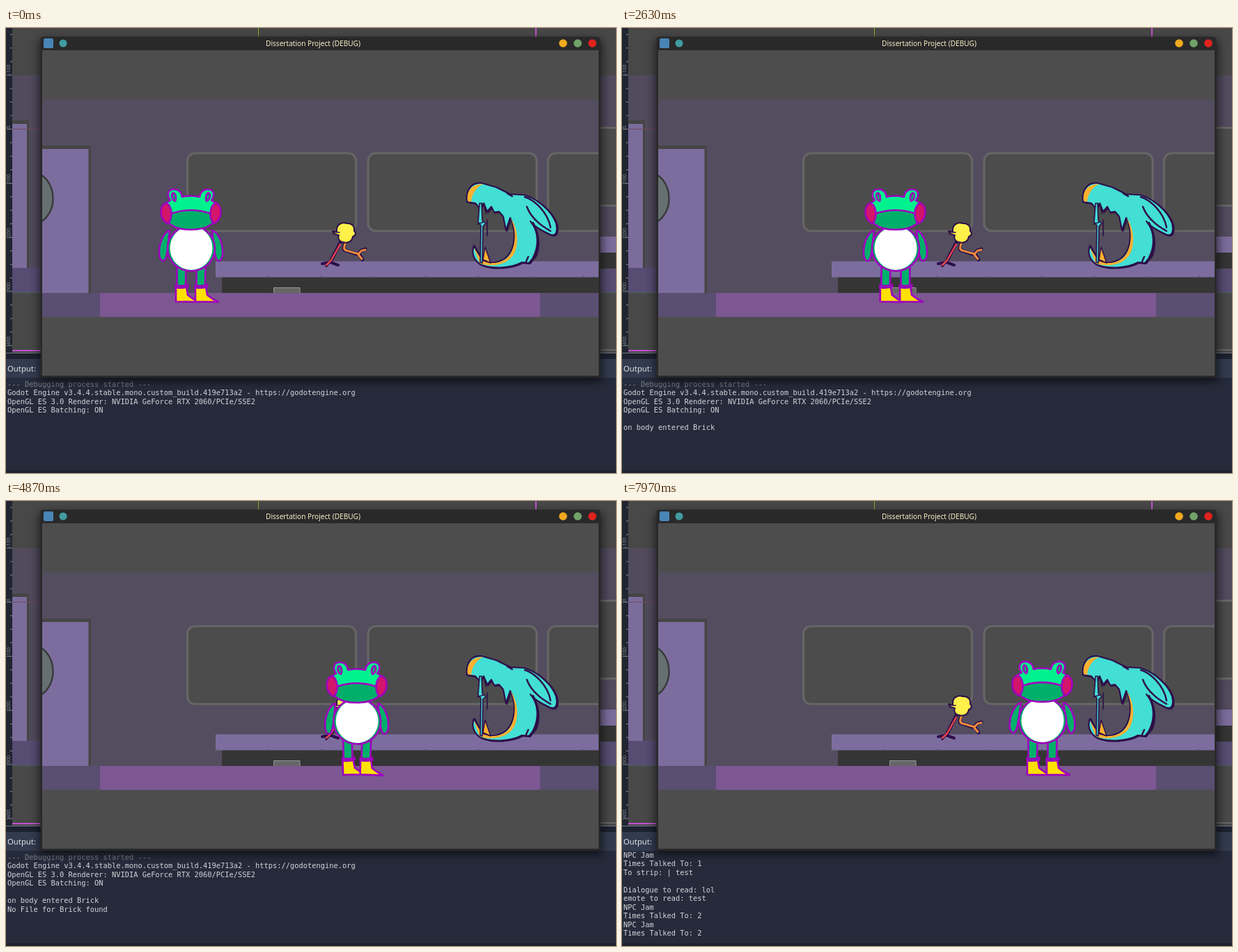
An HTML page that plays this animation: 876x640 px, repeating every 8000 ms.

```html
<!DOCTYPE html>
<html lang="en">
<head>
<meta charset="utf-8">
<title>Frog walk</title>
<style>
html, body { margin: 0; width: 100%; height: 100%; overflow: hidden; background: #262b3b; }
svg { display: block; width: 876px; height: 640px; }
.ui { font-family: "Noto Sans", sans-serif; }
#log { font: 10.38px "DejaVu Sans Mono", monospace; fill: #d3d5d9; white-space: pre; }
.ol { stroke: #a000be; stroke-width: 2.6; stroke-linejoin: round; stroke-linecap: round; }
.ink { stroke: #2d0f4a; stroke-linejoin: round; stroke-linecap: round; }
</style>
</head>
<body>
<svg viewBox="0 0 876 640" xmlns="http://www.w3.org/2000/svg">
<defs>
  <clipPath id="view"><rect x="52" y="32" width="799" height="468"/></clipPath>
  <clipPath id="pane"><rect y="503" width="876" height="133"/></clipPath>
  <filter id="soft" x="-10%" y="-10%" width="120%" height="120%"><feGaussianBlur stdDeviation="7"/></filter>
  <g id="leg">
    <path class="ol" fill="#00b06a" d="M-6.5 340H6.5L6 371H-6.5Z"/>
    <path class="ol" fill="#ffe100" d="M-8 372H7L9 384Q16 390 25 394L-8 393.500Z"/>
    <path class="ol" fill="#00b06a" d="M-8.500 370Q0 372.500 9 369L9.500 372Q0 375 -8.500 373Z" stroke-width="1.500"/>
  </g>
  <path id="arm" class="ol" fill="#00b06a" d="M-30 291C-39 294 -45 309 -45 323C-45 332 -41 337 -37 334C-33 328 -33 318 -32 309Z"/>
  <path id="slit" class="ol" fill="#00b06a" d="M-25 237C-29 240 -26 248 -22 249C-20 245 -21 238 -25 237Z" stroke-width="2"/>
  <path id="eye" class="ol" fill="#d3156b" d="M-36 252C-45 256 -45 275 -33 281C-26 276 -26 262 -31 255Q-33 252 -36 252Z"/>
  <path id="jam" d="M662 250C660 234 668 221 683 223L704 229L724 239L744 240C762 245 784 263 790 281C793 295 789 300 781 297C770 291 761 288 753 278C763 289 767 310 760 327L751 338L741 337C725 346 697 347 681 340C671 333 668 323 672 313L683 334C698 341 716 337 724 323C733 307 731 286 724 273L718 291L714 271L708 264L701 265L697 257L691 264L686 252L680 259L674 252Z"/>
</defs>

<!-- editor -->
<g>
  <path fill="#484848" d="M0 0H876V468H0Z"/>
  <path fill="#514b5d" d="M9 68H876V346H9Z"/>
  <path fill="#444" d="M9 133H33V345H9Z"/>
  <path fill="#7b6c9c" d="M9 138H30V345H9Z"/>
  <path fill="#574c72" d="M9 345H876V380H9Z"/>
  <path fill="#666" d="M840 142H876V257H840Z"/>
  <path fill="#4b4b4b" d="M840 145H876V254H840Z"/>
  <path fill="#7b6c9c" d="M840 300H876V323H840Z"/>
  <path fill="#353535" d="M840 323H876V346H840Z"/>
  <path stroke="#74485a" d="M0 145.500H50"/>
  <path stroke="#4a6360" d="M9 380.500H50M853 380.500H876"/>
  <path stroke="#7fae25" d="M362.500 0V14"/>
  <path stroke="#c552d2" stroke-width="2" d="M761 0V14M9 464H60"/>
  <path stroke="#666" stroke-width="2" d="M840 463H876"/>
  <path fill="#202531" d="M0 0H9V467H0Z"/>
  <g id="ruler" class="ui" font-size="7" fill="#858a94" stroke="none"></g>
  <path fill="#1d2230" d="M0 467H876V640H0Z"/>
  <path stroke="#737680" d="M0 467.500H876"/>
  <path fill="#333b4f" d="M0 476H876V503H0Z"/>
  <path fill="#262b3b" d="M0 503H876V636H0Z"/>
  <text class="ui" x="2" y="493.500" font-size="11.300" fill="#dfe1e5">Output:</text>
  <g clip-path="url(#pane)"><g id="log"></g></g>
</g>

<!-- game window -->
<rect x="48" y="17" width="808" height="491" fill="#000" opacity=".62" filter="url(#soft)"/>
<rect x="49.500" y="12.500" width="804" height="490.500" rx="4" fill="#292929"/>
<rect x="54" y="15" width="14" height="14" rx="2" fill="#4a85b8"/>
<circle cx="82" cy="22" r="5.500" fill="#419ba3"/>
<text class="ui" x="441" y="25.600" font-size="10.100" fill="#f5efc9" text-anchor="middle">Dissertation Project (DEBUG)</text>
<circle cx="800" cy="22" r="5.800" fill="#f2a91d"/>
<circle cx="821" cy="22" r="5.800" fill="#70a368"/>
<circle cx="842" cy="22" r="5.800" fill="#e2231d"/>

<g clip-path="url(#view)">
  <path fill="#4d4d4d" d="M52 32H851V500H52Z"/>
  <path fill="#534d5f" d="M52 102.500H851V381H52Z"/>
  <path fill="#454545" d="M52 169H122V381H52Z"/>
  <path fill="#7c6d9e" d="M52 174H118.500V381H52Z"/>
  <ellipse cx="36" cy="245" rx="31.500" ry="38" fill="#667073" stroke="#3a3a3a" stroke-width="2.400"/>
  <g fill="#4c4c4c" stroke="#666" stroke-width="3.200">
    <rect x="260.500" y="180" width="242" height="112" rx="11"/>
    <rect x="520" y="180" width="242" height="112" rx="11"/>
    <rect x="778.500" y="180" width="242" height="112" rx="11"/>
  </g>
  <path fill="#353535" d="M310 358H851V381H310Z"/>
  <path fill="#7c6d9e" d="M301 335.500H851V358.500H301Z"/>
  <g id="seams" stroke="#4e4662" stroke-width="1.500"></g>
  <path fill="#5a4f70" d="M52 381H851V415.500H52Z"/>
  <path fill="#7d5791" d="M135 381H767V415.500H135Z"/>
  <path fill="#666" stroke="#969696" d="M384.500 381V373.500H422V381"/>

  <!-- yellow bird -->
  <g class="ink" fill="none">
    <path stroke-width="5" d="M480 309L466 336M488 308C485 314 483 319 488 320L506 326L510 320L516 318M508 327L512 333"/>
    <path stroke-width="4" d="M464 337L454 339M463 338L460 342M466 337L477 341"/>
    <path stroke="#e8434f" stroke-width="2.500" d="M480 311L467 334L460 341"/>
    <path stroke="#ff9138" stroke-width="2.800" d="M488 309C485 314 484 319 489 320L506 325L511 320L516 319M506 326L511 332"/>
    <path fill="#fff04a" stroke-width="2" d="M475 290C475 282 483 279 489 281C497 280 501 286 500 292C504 295 501 299 498 300C497 307 491 310 484 308C478 307 476 302 478 298L471 296L469 292L475 293Z"/>
    <path stroke-width="1.500" d="M470 294L479 294"/>
  </g>

  <!-- turquoise creature -->
  <g class="ink">
    <use href="#jam" x="1.500" y="1" fill="#2d0f4a" stroke-width="2"/>
    <use href="#jam" fill="#43ded4" stroke-width="2.200"/>
    <path fill="#ffb02e" stroke="none" d="M663 249C661 235 668 225 685 224C673 231 669 240 668 250ZM672 316L684 335C700 342 719 337 726 322C733 307 732 286 724 273C735 286 737 309 730 324C720 343 693 344 680 338Z"/>
    <path fill="none" stroke-width="2.400" d="M745 243C758 247 778 264 782 287M748 257C753 271 766 283 782 292M757 280C765 296 765 315 757 330M750 329L746 338M720 238L727 242"/>
    <path fill="#43ded4" stroke-width="1.600" d="M680 252L678 279L682 284L681 337L684 338L685 285L689 281L684 277L683 252Z"/>
    <path fill="none" stroke-width="1.600" d="M691 276V299M687 258L690 267M677 282L686 279"/>
    <path fill="#ffb02e" stroke-width="1.500" d="M685 333L688 315L696 338Z"/>
  </g>

  <!-- frog -->
  <g id="frog">
    <use id="legL" href="#leg"/>
    <use id="legR" href="#leg"/>
    <g id="body">
      <use id="armL" href="#arm"/>
      <use id="armR" href="#arm"/>
      <ellipse class="ol" cx="1" cy="317" rx="34" ry="32.500" fill="#00a868"/>
      <ellipse cx="1" cy="316.500" rx="30.500" ry="31.500" fill="#fff"/>
      <path class="ol" fill="#00b06a" d="M-35 258C-41 281 -24 290 .5 290C25 290 42 281 36 258Z"/>
      <path class="ol" fill="#00f28f" d="M-36 253Q-32 249 -29 248C-35 240 -32 232 -24 232C-16 232 -13 237 -12 243Q.5 240 13 243C14 237 17 232 25 232C33 232 36 240 30 248Q33 249 37 253L29 267Q.5 257 -28 267Z"/>
      <use href="#slit"/>
      <use href="#slit" transform="matrix(-1 0 0 1 1 0)"/>
      <use href="#eye"/>
      <use href="#eye" transform="matrix(-1 0 0 1 1 0)"/>
    </g>
  </g>
</g>
</svg>

<script>
const $ = id => document.getElementById(id);
const set = (id, value) => $(id).setAttribute('transform', value);
const LOOP = 8000, LINE = 12.45;

// ruler and seat details
let marks = '';
for (let i = -2; i < 5; i++) {
  const y = 145.5 + i * 77.8;
  marks += `<text transform="translate(5.5 ${y - 1}) rotate(-90)">${i * 100}</text>`;
  for (let k = 0; k < 4; k++)
    marks += `<path stroke="#8a8e97" d="M${k ? 6 : 1} ${y + k * 19.45}H9"/>`;
}
$('ruler').innerHTML = marks;
$('seams').innerHTML = Array.from({ length: 7 }, (_, i) =>
  `<path d="M${377 + i * 75.4} 357V359.500"/>`).join('');

// time and frog position
const path = [
  [0, 265], [1580, 265], [1730, 283], [2630, 392], [2729, 392], [2730, 400],
  [4015, 400], [4230, 426], [4870, 503], [5570, 595], [5629, 595], [5630, 603], [LOOP, 603]
];
// start, last moving step, end
const walks = [[1580, 2630, 2730], [4015, 5570, 5630]];

const log = [
  [0, '--- Debugging process started ---'],
  [0, 'Godot Engine v3.4.4.stable.mono.custom_build.419e713a2 - https://godotengine.org'],
  [0, 'OpenGL ES 3.0 Renderer: NVIDIA GeForce RTX 2060/PCIe/SSE2'],
  [0, 'OpenGL ES Batching: ON'],
  [2500, ''], [2500, 'on body entered Brick'],
  [3150, 'No File for Brick found'],
  [5450, 'on body entered Jam'],
  [5950, 'NPC Jam'], [5950, 'Times Talked To: 1'], [5950, 'To strip: | test'], [5950, ''],
  [5950, 'Dialogue to read: lol'], [5950, 'emote to read: test'],
  [7200, 'NPC Jam'], [7200, 'Times Talked To: 2'],
  [7900, 'NPC Jam'], [7900, 'Times Talked To: 2']
];
const rows = log.map(([, words], i) => {
  const row = document.createElementNS('http://www.w3.org/2000/svg', 'text');
  row.setAttribute('x', 2);
  row.setAttribute('y', 515.8 + i * LINE);
  if (!i) row.setAttribute('fill', '#7d818a');
  row.textContent = words;
  return $('log').appendChild(row);
});

function posAt(t) {
  const i = path.findIndex(p => p[0] > t);
  const [t0, x0] = path[i - 1], [t1, x1] = path[i];
  return x0 + (x1 - x0) * (t - t0) / (t1 - t0);
}

function draw(t) {
  const walk = walks.find(w => t >= w[0] && t < w[2]);
  let swing = 0, lift, arm = 0;
  if (walk) {
    const step = Math.max(0, Math.min(t, walk[1]) - walk[0] - 195);
    // the cube lets the legs rest near upright
    swing = Math.sin(step * 2 * Math.PI / 420) ** 3;
    lift = 2 * swing * swing;
  } else {
    const low = t < 2000 ? 100 : t < 5000 ? 3565 : 6815;
    const breath = (1 - Math.cos((t - low) * 2 * Math.PI / 1850)) / 2;
    lift = -1.3 * breath;
    arm = 3 * breath;
  }
  set('frog', `translate(${posAt(t)} 0)`);
  set('body', `translate(0 ${lift})`);
  set('legL', `translate(-13 ${swing * swing}) rotate(${21 * swing} 0 332)`);
  set('legR', `translate(15 ${swing * swing}) rotate(${-16 * swing} 0 332)`);
  set('armL', `rotate(${arm} -31 293)`);
  set('armR', `matrix(-1 0 0 1 1 0) rotate(${arm} -31 293)`);

  const count = log.filter(l => l[0] <= t).length;
  rows.forEach((row, i) => row.style.display = i < count ? '' : 'none');
  const over = 512 + (count - 1) * LINE - 621.3;
  set('log', `translate(0 ${-Math.max(0, over)})`);
}

const start = performance.now();
function tick() {
  draw((performance.now() - start) % LOOP);
  requestAnimationFrame(tick);
}
tick();
</script>
</body>
</html>
```
